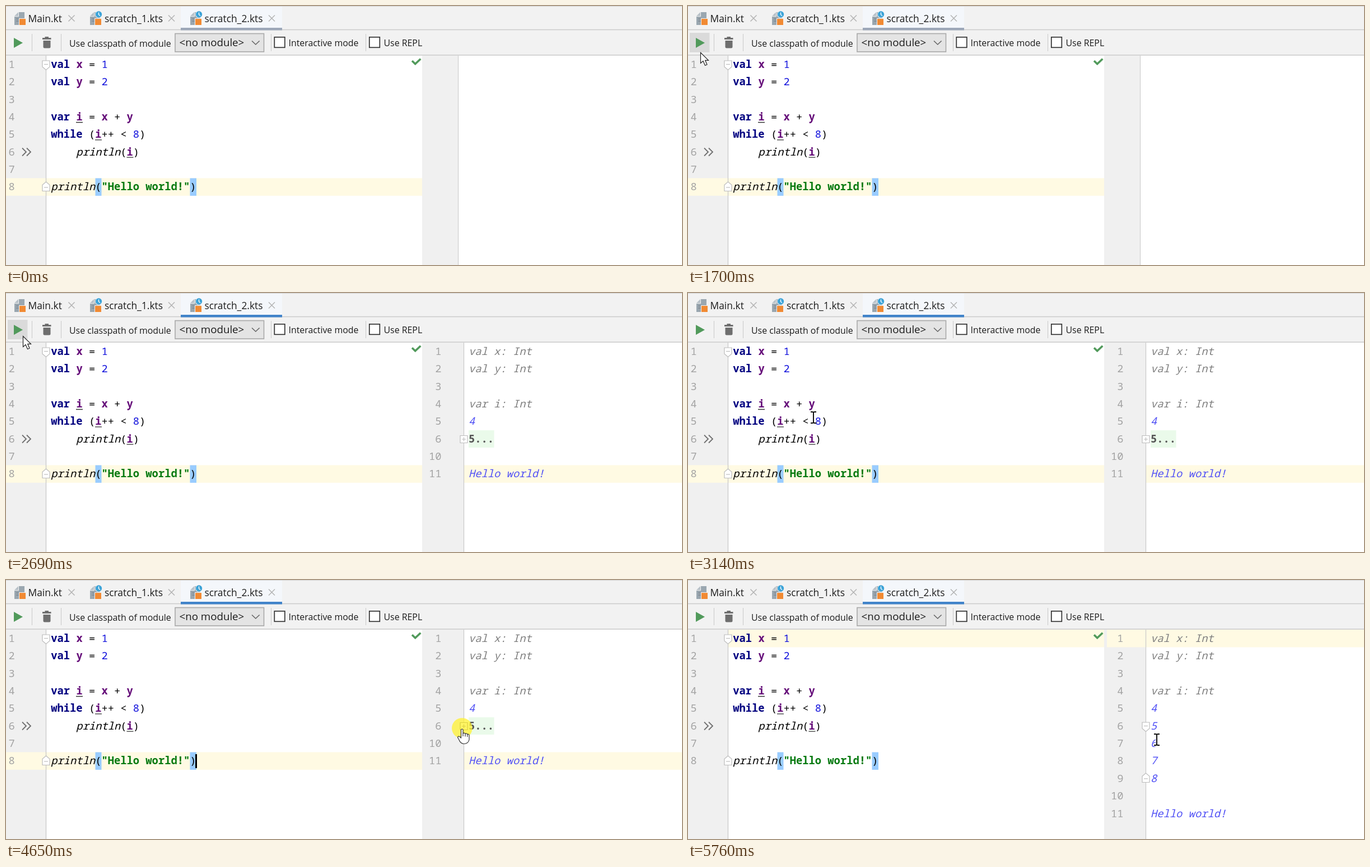
An HTML page for the animation above (6190 ms loop, 1207 px wide and 464 px high).

```html
<!DOCTYPE html>
<html lang="en">
<head>
<meta charset="utf-8">
<title>Scratch file run</title>
<style>
  html, body { margin: 0; width: 100%; height: 100%; overflow: hidden; background: #fff; }
  svg { display: block; }
  text { white-space: pre; }
  .ui { font-family: "Open Sans", "Noto Sans", sans-serif; fill: #1c1c1c; }
  .tab { font-size: 17.4px; }
  .label { font-size: 15.9px; }
  .mono { font-family: "Noto Sans Mono", "DejaVu Sans Mono", monospace; font-size: 18.8px; fill: #000; }
  .num { fill: #a3a3a3; }
  .kw { fill: #000080; font-weight: 700; }
  .id { fill: #660e7a; font-weight: 700; }
  .int { fill: #1010dc; }
  .str { fill: #067a10; font-weight: 700; }
  .it { font-style: italic; }
  .type { fill: #808080; font-style: italic; }
  .res { fill: #5252f5; font-style: italic; }
  .fold { fill: #555; font-weight: 700; }
  .line { fill: none; stroke: #c9c9c9; }
  .mark { fill: #fff; stroke: var(--mark, #bcbcbc); stroke-width: 1.2; }
  .hovered { --mark: #6e6e6e; }
</style>
</head>
<body>
<svg width="1207" height="464" viewBox="0 0 1207 464">
  <defs>
    <g id="page">
      <path d="M8 0H18V11H8V23H0V8H8Z" fill="#9aa7b0"/>
      <path d="M0 7L7 0V7Z" fill="#b7c0c7"/>
      <path d="M3 12H8M3 16H8" stroke="#7f8b94" stroke-width="1.5"/>
      <rect x="9" y="12" width="11" height="11" fill="#f18a33"/>
    </g>
    <g id="clock">
      <circle r="6.6" fill="#f2f2f2"/>
      <circle r="5.7" fill="#3ba3d8"/>
      <path d="M0 -3.5V.5L2.5 2.5" fill="none" stroke="#fff" stroke-width="1.4"/>
    </g>
    <path id="close" d="M-5.5 -5.5L5.5 5.5M5.5 -5.5L-5.5 5.5" stroke="#b3b3b3" stroke-width="1.5"/>
    <g id="foldTop">
      <path class="mark" d="M-6.5 -8H6.5V3L0 8.5L-6.5 3Z"/>
      <path class="mark" d="M-3.5 -1.5H3.5"/>
    </g>
    <g id="foldEnd">
      <path class="mark" d="M-6.5 8H6.5V-3L0 -8.5L-6.5 -3Z"/>
      <path class="mark" d="M-3.5 1.5H3.5"/>
    </g>
  </defs>

  <!-- tabs -->
  <rect width="1207" height="88" fill="#f2f2f2"/>
  <path class="line" d="M0 .5H1207" stroke-opacity=".7"/>
  <rect x="312" y="1" width="181" height="41" fill="#f4f7fb"/>
  <path class="line" d="M0 42.5H1207M0 88H1207" stroke-width="1.4"/>
  <rect id="underline" x="312" y="39" width="181" height="4.5"/>
  <use href="#page" x="15" y="11"/>
  <use href="#page" x="150" y="11"/>
  <use href="#page" x="329" y="11"/>
  <use href="#clock" x="165.5" y="15"/>
  <use href="#clock" x="344.5" y="15"/>
  <g class="ui tab">
    <text x="39.5" y="29">Main.kt</text>
    <text x="176" y="29">scratch_1.kts</text>
    <text x="354.5" y="29">scratch_2.kts</text>
  </g>
  <use href="#close" x="117" y="22"/>
  <use href="#close" x="295.5" y="22"/>
  <use href="#close" x="474.5" y="22"/>

  <!-- toolbar -->
  <rect id="hover" x="3" y="48" width="35.5" height="35" fill="#dadada"/>
  <path id="run" d="M14 57V75L30 66Z" fill="#519a5b"/>
  <rect id="stop" x="12.5" y="58" width="16.5" height="16" fill="#db5860"/>
  <path d="M65 57H69.5V55H76V57H80.5V60H65ZM66.5 62H79.5V73Q79.5 75.5 77 75.5H69Q66.5 75.5 66.5 73Z" fill="#6e6e6e"/>
  <path class="line" d="M46.5 50V81M98.5 50V81M473.5 50V81M642.5 50V81"/>
  <rect x="302" y="49.5" width="158.5" height="32.5" fill="#e4e4e4" stroke="#a8a8a8" stroke-width="1.6"/>
  <path d="M439 62.5L445.8 69L452.6 62.5" fill="none" stroke="#666" stroke-width="1.6"/>
  <g fill="#fff" stroke="#333" stroke-width="1.7">
    <rect x="479.3" y="55.8" width="18.5" height="18.5"/>
    <rect x="648.8" y="55.8" width="18.5" height="18.5"/>
  </g>
  <g class="ui label">
    <text x="113" y="73">Use classpath of module</text>
    <text x="309.5" y="72" font-size="18.7">&lt;no module&gt;</text>
    <text x="504.5" y="72">Interactive mode</text>
    <text x="674.5" y="72">Use REPL</text>
  </g>

  <!-- editor -->
  <rect y="89" width="71" height="375" fill="#f0f0f0"/>
  <rect id="rowLeft" width="743" height="31.5" fill="#fffae3"/>
  <path class="line" d="M71.5 89V464" stroke-width="1.3"/>
  <path d="M159.5 308.5H170.5V340H159.5ZM328.5 308.5H340V340H328.5Z" fill="#99ccff"/>
  <use href="#foldTop" x="71.5" y="106"/>
  <use href="#foldEnd" x="71.5" y="323.5"/>
  <path d="M29 254.5L36 261.5L29 268.5M37 254.5L44 261.5L37 268.5" fill="none" stroke="#6e6e6e" stroke-width="1.8"/>
  <path d="M725 98.3L730.7 103.8L740.3 94.8" fill="none" stroke="#519a5b" stroke-width="3.6"/>
  <g id="leftNums"></g>
  <g id="code"></g>
  <path d="M125 208.5H137M159 239.8H171M215.5 271.2H227.5" stroke="#333" stroke-width="1.3"/>

  <!-- output -->
  <rect x="743" y="89" width="64" height="375" fill="#f0f0f0"/>
  <path class="line" d="M807.5 89V464"/>
  <g id="out">
    <rect x="748" y="89" width="69" height="375" fill="#f0f0f0"/>
    <rect x="807" y="89" width="400" height="375" fill="#fff"/>
    <rect x="807" y="89" width="10" height="375" fill="#f0f0f0"/>
    <rect id="rowRight" width="459" height="31.5" fill="#fffae3"/>
    <path class="line" d="M817.5 89V464" stroke-width="1.2"/>
    <g id="shared"></g>
    <g id="folded">
      <rect x="826" y="246" width="45.5" height="31" fill="#eafaea"/>
      <path class="mark" d="M811 255.5H824V268.5H811ZM814 262H821M817.5 258.5V265.5"/>
    </g>
    <g id="unfolded">
      <path id="foldLine" d="M817.5 262V355" stroke="#555" stroke-width="1.3"/>
      <use href="#foldTop" x="817.5" y="263"/>
      <use href="#foldEnd" x="817.5" y="354.5"/>
    </g>
  </g>

  <rect id="caret" width="3" height="25"/>
  <circle id="click" r="18.3" fill="#fff230" fill-opacity=".75"/>

  <g id="pointer">
    <path id="arrow" d="M.5 .5V19.5L5 15.5L8.5 23.5L12 22L8.7 14.3H14.5Z" fill="#fff" stroke="#222" stroke-width="1.2"/>
    <g id="beam" fill="none">
      <path d="M-5 -10H-2Q0 -10 0 -8Q0 -10 2 -10H5M0 -8V8M-5 10H-2Q0 10 0 8Q0 10 2 10H5" stroke="#fff" stroke-width="4" stroke-opacity=".8"/>
      <path d="M-5 -10H-2Q0 -10 0 -8Q0 -10 2 -10H5M0 -8V8M-5 10H-2Q0 10 0 8Q0 10 2 10H5" stroke="#111" stroke-width="2"/>
    </g>
    <g id="hand" fill="#fff" stroke="#333" stroke-width="1.2" stroke-linejoin="round">
      <path d="M1 2Q3 0 4.500 2V9Q6.500 7 8.500 9.500Q10.500 8 12.300 10.300Q15 9.500 15.500 12.500V20Q14 27.500 6 27.500Q0 27 -2.500 20.500L-5 16Q-4 13 -1.500 14.500L1 17Z"/>
      <path d="M4.500 9V14M8.500 9.500V14.500M12.300 10.300V15"/>
    </g>
  </g>
</svg>
<script>
const LOOP = 6190, ROW = 31.35;
const $ = id => document.getElementById(id);
const rowTop = n => 89 + (n - 1) * ROW;

// Tokens are written as class:text, separated by |
function addText(group, x, row, tokens, anchor = "start") {
  const make = tag => document.createElementNS("http://www.w3.org/2000/svg", tag);
  const text = make("text");
  text.setAttribute("x", x);
  text.setAttribute("y", rowTop(row) + 22);
  text.setAttribute("class", "mono");
  text.setAttribute("text-anchor", anchor);
  for (const token of tokens.split("|")) {
    const cut = token.indexOf(":");
    const span = make("tspan");
    span.setAttribute("class", token.slice(0, cut));
    span.textContent = token.slice(cut + 1);
    text.append(span);
  }
  $(group).append(text);
}

const code = [
  "kw:val |id:x|: = |int:1",
  "kw:val |id:y|: = |int:2",
  "",
  "kw:var |id:i|: = |id:x|: + |id:y",
  "kw:while|: (|id:i|:++ < |int:8|:)",
  "it:    println|:(|id:i|:)",
  "",
  'it:println|:(|str:"Hello world!"|:)'
];
code.forEach((line, i) => {
  addText("leftNums", 4.5, i + 1, "num:" + (i + 1));
  if (line) addText("code", 80.3, i + 1, line);
});

const outNum = (group, row, n) => addText(group, 777.5, row, "num:" + n, "end");
const outText = (group, row, tokens) => addText(group, 826, row, tokens);
for (let n = 1; n <= 6; n++) outNum("shared", n, n);
outText("shared", 1, "type:val x: Int");
outText("shared", 2, "type:val y: Int");
outText("shared", 4, "type:var i: Int");
outText("shared", 5, "res:4");
outText("folded", 6, "fold:5...");
outNum("folded", 7, 10);
outNum("folded", 8, 11);
outText("folded", 8, "res:Hello world!");
for (let n = 7; n <= 11; n++) outNum("unfolded", n, n);
for (let n = 5; n <= 8; n++) outText("unfolded", n + 1, "res:" + n);
outText("unfolded", 11, "res:Hello world!");

// time, x, y, shape
const moves = [
  [0, 0, 0, ""],
  [930, 69, 416, "arrow"], [1040, 63, 350, "arrow"], [1150, 54, 280, "arrow"],
  [1260, 44, 215, "arrow"], [1370, 35, 167, "arrow"], [1480, 28, 137, "arrow"],
  [1610, 24, 104, "arrow"], [1700, 22, 83, "arrow"], [1830, 22, 76, "arrow"],
  [1920, 22, 72, "arrow"],
  [2690, 30, 77, "arrow"], [2800, 62, 108, "arrow"], [2910, 112, 155, "beam"],
  [3030, 172, 197, "beam"], [3140, 224, 223, "beam"], [3230, 350, 238, "beam"],
  [3350, 470, 245, "beam"], [3460, 580, 253, "beam"], [3570, 665, 260, "beam"],
  [3690, 728, 267, "beam"], [3800, 765, 271, "arrow"], [3910, 789, 268, "arrow"],
  [4010, 800, 262, "arrow"], [4130, 806, 256, "arrow"],
  [4440, 811.5, 266, "hand"], [4980, 818, 270, "hand"],
  [5090, 832, 282, "beam"], [5210, 835, 285, "beam"], [5420, 837, 286, "beam"]
];
const caretFlips = [2160, 2690, 3230, 3690, 4130, 5760];

const show = (id, on) => { $(id).style.display = on ? "" : "none"; };
const place = (id, x, y) => $(id).setAttribute("transform", `translate(${x} ${y})`);

function draw(t) {
  const within = (a, b) => t >= a && t < b;
  const [, x, y, shape] = moves.findLast(m => m[0] <= t);
  for (const id of ["arrow", "beam", "hand"]) show(id, id === shape);
  place("pointer", x, y);

  const running = within(2160, 2690), open = t >= 4770;
  show("hover", within(1700, 2800));
  show("run", !running);
  show("stop", running);
  $("underline").setAttribute("fill", t < 2160 ? "#9ca7b8" : "#4083c9");

  const hovered = shape === "hand";
  show("out", t >= 2690);
  show("folded", !open);
  show("unfolded", open);
  show("foldLine", hovered);
  $("out").classList.toggle("hovered", hovered);

  // The current row reaches into the gutter only on the focused side
  const row = rowTop(open ? 1 : 8);
  place("rowLeft", open ? 72 : 0, row);
  place("rowRight", open ? 748 : 817, row);

  show("caret", caretFlips.filter(c => c <= t).length % 2);
  place("caret", open ? 826.5 : 338, open ? 92 : 312);

  const second = t >= 4650;
  show("click", within(2160, 2310) || within(4650, 4870));
  place("click", second ? 814.3 : 22, second ? 265.5 : 73);
}

const start = performance.now();
function tick() {
  draw((performance.now() - start) % LOOP);
  requestAnimationFrame(tick);
}
tick();
</script>
</body>
</html>
```
